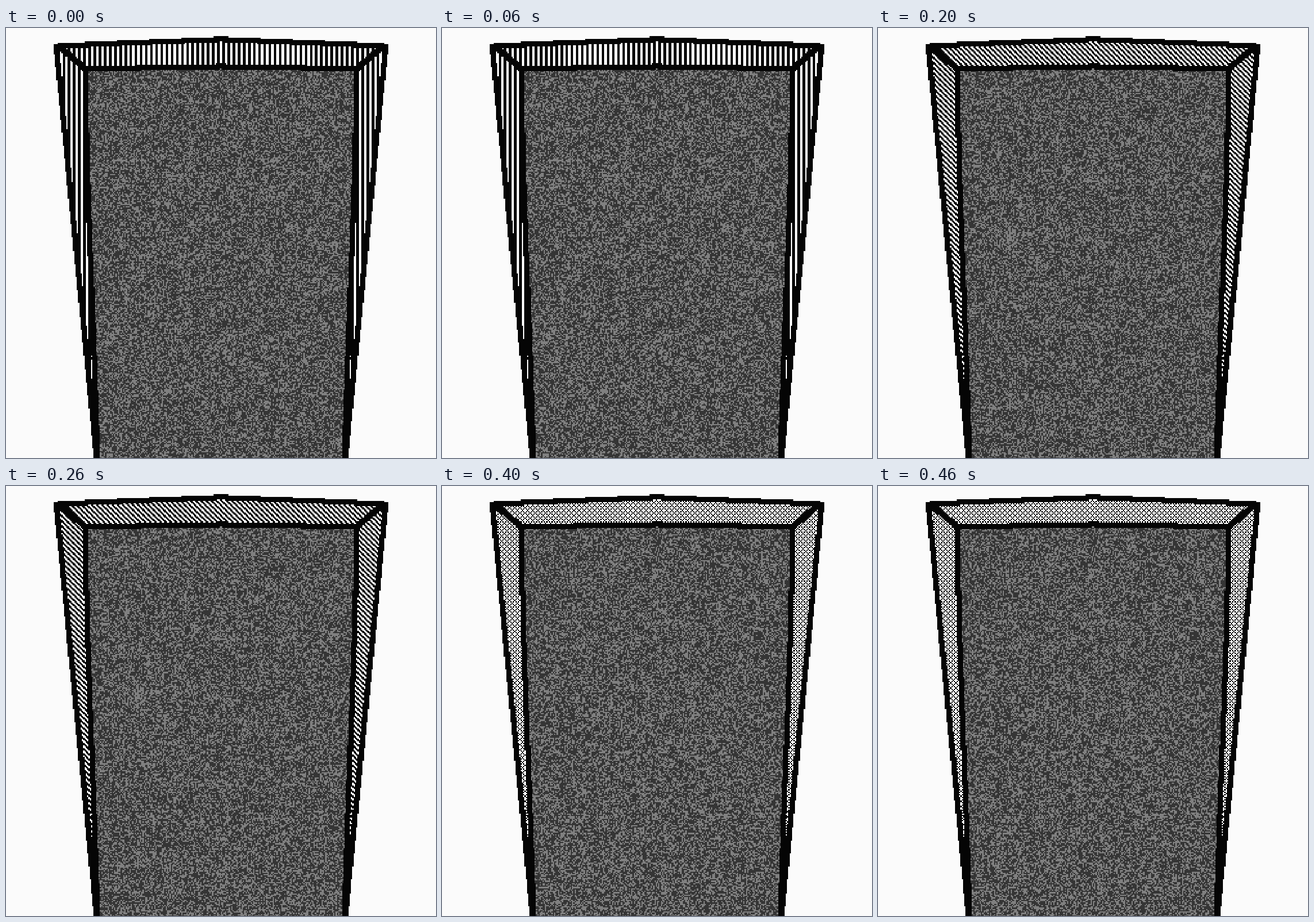
Write an HTML page with a canvas that moves like this. It is 748 px wide and 748 px high and loops after 500 ms.

```html
<!DOCTYPE html>
<html>
<head>
<meta charset="utf-8">
<style>
  html, body { margin: 0; height: 100%; overflow: hidden; background: #fbfbfb; }
  canvas { position: absolute; left: 0; top: 1px; width: 748px; height: 748px; image-rendering: pixelated; }
</style>
</head>
<body>
<canvas id="stage" width="334" height="334"></canvas>
<script>
// Everything is drawn on a coarse grid of 334 cells, enlarged with hard edges.
const SIZE = 334, PEN = 4, INK = '#050505', PAPER = '#fbfbfb';
const ctx = document.getElementById('stage').getContext('2d');

// Hatch styles on a 4 x 4 tile: true means ink.
const hatches = [
  (x, y) => (x & 3) < 2,
  (x, y) => (x + y & 3) < 2,
  (x, y) => (x - y & 3) < 2,
  (x, y) => !(x & 3) || !(y & 3),
  (x, y) => !(x + y & 3) || !(x - y & 3)
];

function hatchPattern(isInk) {
  const tile = document.createElement('canvas');
  tile.width = tile.height = 4;
  const t = tile.getContext('2d');
  for (let y = 0; y < 4; y++) for (let x = 0; x < 4; x++) {
    t.fillStyle = isInk(x, y) ? INK : '#fff';
    t.fillRect(x, y, 1, 1);
  }
  return ctx.createPattern(tile, 'repeat');
}
const patterns = hatches.map(hatchPattern);

// Closed shape from its left half, mirrored about the centre line.
function mirrored(points) {
  const path = new Path2D();
  points.forEach(([x, y]) => path.lineTo(x, y));
  points.slice().reverse().forEach(([x, y]) => path.lineTo(SIZE - x, y));
  path.closePath();
  return path;
}
const box = mirrored([[70, SIZE], [39, 13], [167, 8]]);
const panel = mirrored([[71, SIZE], [63, 107], [62, 30], [167, 29]]);

// Square pen dragged along a stepped line, on both sides at once.
function penLine(x0, y0, x1, y1) {
  const steps = Math.round(Math.max(Math.abs(x1 - x0), Math.abs(y1 - y0)));
  for (let i = 0; i <= steps; i++) {
    const x = Math.floor(x0 + (x1 - x0) * i / steps + 1e-6);
    const y = Math.ceil(y0 + (y1 - y0) * i / steps - 1e-6);
    ctx.fillRect(x, y, PEN, PEN);
    ctx.fillRect(SIZE - PEN - x, y, PEN, PEN);
  }
}

function random(seed) {
  return () => {
    seed = seed + 0x6D2B79F5 | 0;
    let t = Math.imul(seed ^ seed >>> 15, 1 | seed);
    t = t + Math.imul(t ^ t >>> 7, 61 | t) ^ t;
    return ((t ^ t >>> 14) >>> 0) / 4294967296;
  };
}

function drawStatic(seed) {
  const next = random(seed);
  ctx.fillStyle = '#353535';
  ctx.fillRect(0, 0, SIZE, SIZE);
  ctx.fillStyle = '#808080';
  for (let y = 28; y < SIZE; y++) for (let x = 62; x < SIZE - 62; x++)
    if (next() < 0.42) ctx.fillRect(x, y, 1, 1);
}

function fillInside(path, paint) {
  ctx.save();
  ctx.clip(path);
  paint();
  ctx.restore();
}

function draw(step) {
  ctx.fillStyle = PAPER;
  ctx.fillRect(0, 0, SIZE, SIZE);
  fillInside(box, () => {
    ctx.fillStyle = patterns[step];
    ctx.fillRect(0, 0, SIZE, SIZE);
  });
  fillInside(panel, () => drawStatic(step * 977 + 11));

  ctx.fillStyle = INK;
  penLine(40, 10.84, 167, 5.76);      // back rim
  penLine(37.6, 12, 69.15, SIZE);     // outer sides
  penLine(40, 12, 60, 29);            // corner edges
  penLine(60, 28.69, 167, 26.93);     // front rim
  penLine(60, 29, 61.5, 107);         // inner sides
  penLine(61.5, 107, 70, SIZE);

  ctx.fillStyle = '#fff';
  ctx.fillRect(66, 254, 1, 1);
  ctx.fillRect(SIZE - 67, 254, 1, 1);
}

let shown = -1;
function tick() {
  const step = Math.floor(performance.now() / 100) % hatches.length;
  if (step !== shown) draw(shown = step);
  requestAnimationFrame(tick);
}
tick();
</script>
</body>
</html>
```
